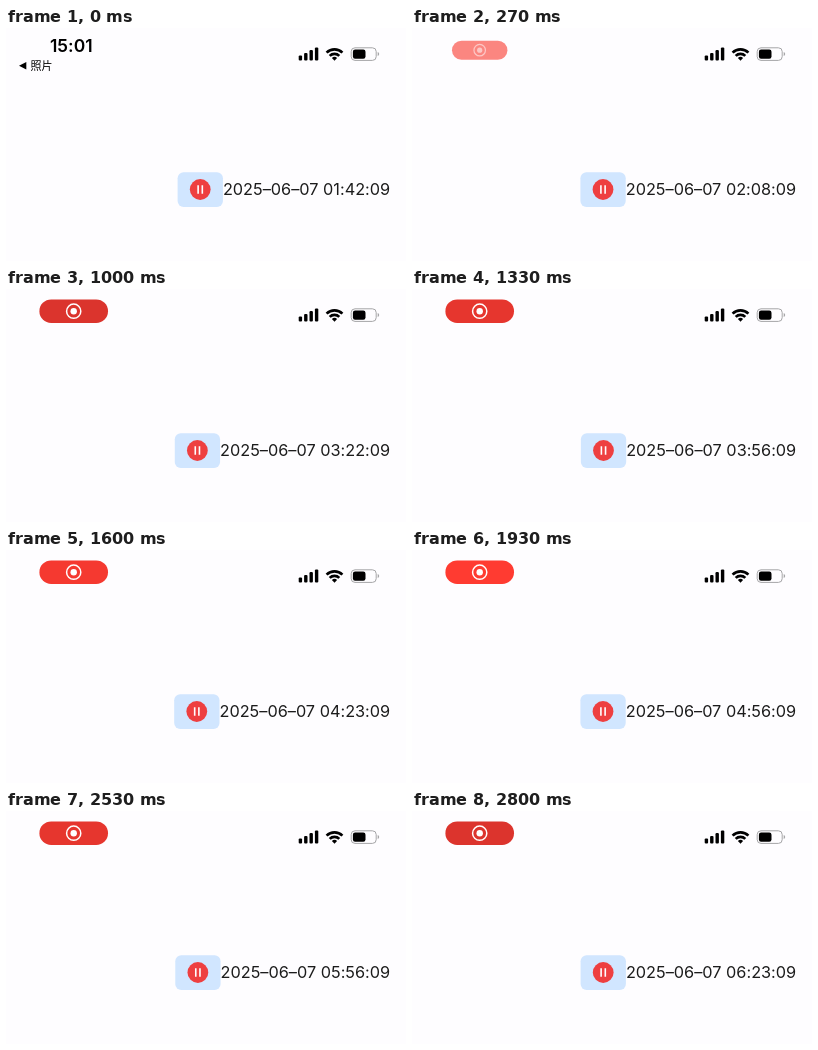
An HTML page that plays this animation: 400 by 233 pixels, repeating every 2.87 s.

```html
<!DOCTYPE html>
<html lang="zh">
<head>
<meta charset="utf-8">
<style>
  html, body { margin: 0; width: 100%; height: 100%; overflow: hidden; background: #fefdff; }
  svg { display: block; }
  text { font-family: Inter, "Liberation Sans", sans-serif; font-feature-settings: "calt" 0; }
  #back { font: 500 11px "Noto Sans CJK SC", "Noto Sans CJK", sans-serif; }
</style>
</head>
<body>
<svg width="400" height="233" viewBox="0 0 400 233">
  <g id="clock">
    <text x="65.3" y="24.3" font-size="17.5" font-weight="600" text-anchor="middle">15:01</text>
    <path d="M13 37.8l7.3-3.8v7.6z"/>
    <text id="back" x="24.5" y="41.8">照片</text>
  </g>

  <g id="pill">
    <rect id="pillBody" x="-34.3" y="-11.8" width="68.6" height="23.6" rx="11.8"/>
    <g id="dot">
      <circle r="7.1" fill="none" stroke="#fff" stroke-width="1.5"/>
      <circle r="3.2" fill="#fff"/>
    </g>
  </g>

  <!-- signal, wifi, battery -->
  <g transform="translate(-.3 -.2)">
    <rect x="293" y="27.6" width="3.4" height="5.2" rx="1.1"/>
    <rect x="298.4" y="25.2" width="3.4" height="7.6" rx="1.1"/>
    <rect x="303.8" y="22.3" width="3.4" height="10.5" rx="1.1"/>
    <rect x="309.2" y="19.6" width="3.4" height="13.2" rx="1.1"/>
    <g fill="none" stroke="#000" stroke-width="2.7">
      <path d="M320.9 24.8a11.2 11.2 0 0 1 15.8 0M324 28.1a6.8 6.8 0 0 1 9.6 0"/>
      <path d="M328.8 32.9l-2.6-2.7a3.7 3.7 0 0 1 5.2 0z" fill="#000" stroke="none"/>
    </g>
    <rect x="345.5" y="20" width="25" height="12.6" rx="3.8" fill="none" stroke="#a5a5a7"/>
    <rect x="347.2" y="21.7" width="12.6" height="9.2" rx="2.2"/>
    <path d="M372 24.3q1.5.5 1.5 2t-1.5 2z" fill="#a5a5a7"/>
  </g>

  <g id="button">
    <rect y="144.3" x="-45.3" width="45.3" height="34.7" rx="6" fill="#d1e6ff"/>
    <circle cx="-22.7" cy="161.5" r="10.4" fill="#ee3f40"/>
    <path d="M-24.8 157.2v8.6M-20.6 157.2v8.6" stroke="#fff" stroke-width="1.6"/>
  </g>
  <text id="stamp" x="384.2" y="167.4" font-size="16.3" fill="#1c1c1c" text-anchor="end"></text>
</svg>
<script>
const $ = id => document.getElementById(id);
const LOOP = 2870, RIGHT = 384.2;
const clamp = v => Math.max(0, Math.min(1, v));
const mix = (a, b, k) => Math.round(a + (b - a) * k);
const pad = n => String(n).padStart(2, "0");

function draw(t) {
  // the picture steps fifteen times a second
  const step = Math.floor((Math.floor(t / 10) * 10 + 4) * 0.015);
  const now = step * 1000 / 15;

  const minutes = Math.floor(102.1 + step * 6.705);
  $("stamp").textContent = `2025–06–07 ${pad(Math.floor(minutes / 60))}:${pad(minutes % 60)}:09`;
  const left = RIGHT - $("stamp").getComputedTextLength();
  $("button").setAttribute("transform", `translate(${left} 0)`);

  $("clock").setAttribute("opacity", clamp(1 - now / 190));

  const grow = clamp((now - 130) / 340);
  const scale = 0.68 + 0.32 * grow;
  $("pill").setAttribute("transform", `translate(67.7 22.2) scale(${scale})`);
  $("pill").setAttribute("opacity", clamp((now - 130) / 225));
  $("dot").setAttribute("opacity", clamp((now - 130) / 250));

  const glow = (1 - Math.cos((now - 980) / 950 * Math.PI)) / 2;
  $("pillBody").setAttribute("fill", `rgb(${mix(219, 255, glow)},${mix(52, 59, glow)},${mix(45, 49, glow)})`);
}

const start = performance.now();
function tick() {
  draw((performance.now() - start) % LOOP);
  requestAnimationFrame(tick);
}
tick();
</script>
</body>
</html>
```
